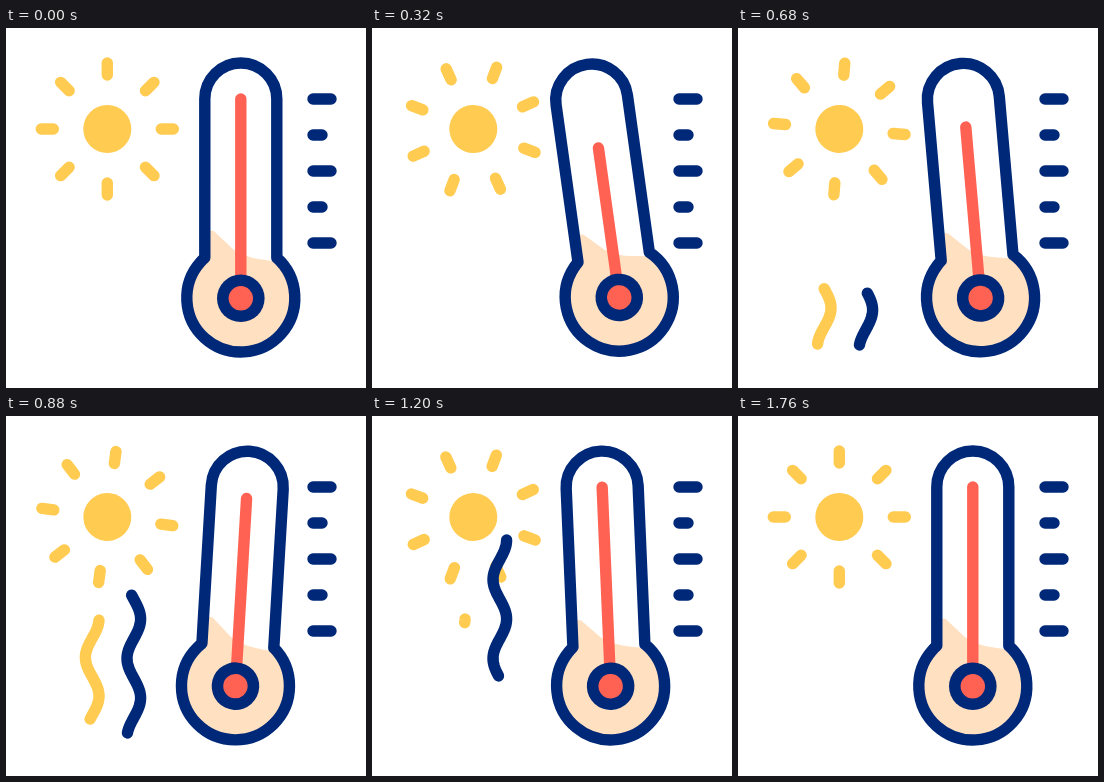
Animation, 360 px wide and 360 px high, one loop 2 s. Source, as an HTML page with a canvas:

```html
<!DOCTYPE html>
<html lang="en">
<head>
<meta charset="utf-8">
<title>Thermometer and sun</title>
<style>
  html, body { margin: 0; width: 100%; height: 100%; overflow: hidden; background: #fff; }
  canvas { display: block; width: 360px; height: 360px; }
</style>
</head>
<body>
<canvas id="stage"></canvas>
<script>
const NAVY = '#002878', RED = '#ff6253', YELLOW = '#ffcb50', PEACH = '#ffe0c0';
const LOOP = 2000, STEP = 40, REST = 1760, TAU = Math.PI * 2;

const canvas = document.getElementById('stage');
const dpr = window.devicePixelRatio || 1;
canvas.width = canvas.height = Math.round(360 * dpr);
const ctx = canvas.getContext('2d');

// Eased progress from 0 to 1 between times a and b; skew > 1 delays the start.
function ramp(t, a, b, skew = 1) {
  const u = Math.pow(Math.min(1, Math.max(0, (t - a) / (b - a))), skew);
  return u * u * (3 - 2 * u);
}

// Eased value through [time, value] keys.
function track(t, keys) {
  let v = keys[0][1];
  for (let i = 1; i < keys.length; i++) {
    v += (keys[i][1] - keys[i - 1][1]) * ramp(t, keys[i - 1][0], keys[i][0]);
  }
  return v;
}

function line(color, x1, y1, x2, y2) {
  ctx.strokeStyle = color;
  ctx.beginPath();
  ctx.moveTo(x1, y1);
  ctx.lineTo(x2, y2);
  ctx.stroke();
}

function disc(color, x, y, r) {
  ctx.fillStyle = color;
  ctx.beginPath();
  ctx.arc(x, y, r, 0, TAU);
  ctx.fill();
}

function turned(x, y, deg, draw) {
  ctx.save();
  ctx.translate(x, y);
  ctx.rotate(deg * Math.PI / 180);
  draw();
  ctx.restore();
}

function sun(t) {
  const deg = -40.5 * (ramp(t, 0, 565) - ramp(t, 560, REST, 1.35));
  turned(101.3, 101, deg, () => {
    disc(YELLOW, 0, 0, 24);
    for (let i = 0; i < 8; i++) {
      line(YELLOW, 0, -54, 0, -66);
      ctx.rotate(TAU / 8);
    }
  });
}

// Rising heat wave, visible from its tail up to its head.
function wave(color, mid, bottom, top, period, head, tail) {
  if (head <= 0 || tail >= 1) return;
  const from = bottom + (top - bottom) * tail;
  const to = bottom + (top - bottom) * head;
  const x = y => mid + 6.8 * Math.cos(TAU * (y - 203) / period);
  ctx.strokeStyle = color;
  ctx.beginPath();
  ctx.moveTo(x(from), from);
  for (let y = from - 1; y > to; y--) ctx.lineTo(x(y), y);
  ctx.lineTo(x(to), to);
  ctx.stroke();
}

function waves(t) {
  wave(YELLOW, 86.2, 316, 203, 77, ramp(t, 458, 908), ramp(t, 781, 1251));
  wave(NAVY, 127.8, 317, 124, 79, ramp(t, 458, 1110), ramp(t, 954, 1637));
}

// Local origin is the pivot, halfway down the stage.
function body() {
  const a = Math.acos(36 / 54);
  ctx.beginPath();
  ctx.arc(0, -109, 36, Math.PI, 0);
  ctx.lineTo(36, 50);
  ctx.arc(0, 90, 54, -a, Math.PI + a);
  ctx.closePath();
}

function liquid() {
  ctx.save();
  body();
  ctx.clip();
  ctx.fillStyle = PEACH;
  ctx.beginPath();
  ctx.moveTo(-37, 22);
  ctx.lineTo(-27, 23);
  ctx.lineTo(-8, 41);
  ctx.quadraticCurveTo(4, 49, 18, 51);
  ctx.lineTo(37, 54);
  ctx.lineTo(70, 54);
  ctx.lineTo(70, 150);
  ctx.lineTo(-70, 150);
  ctx.lineTo(-70, 22);
  ctx.fill();
  ctx.restore();
}

function thermometer(t) {
  const deg = track(t, [[0, 0], [525, -12], [855, 3.5], [1175, -2.5], [1450, 0]]);
  const drop = 48.5 * (ramp(t, 0, 297) - ramp(t, 297, 1145));
  turned(234.8, 180, deg, () => {
    liquid();
    line(RED, 0, -109 + drop, 0, 72);
    body();
    ctx.strokeStyle = NAVY;
    ctx.stroke();
    disc(NAVY, 0, 90.3, 23.8);
    disc(RED, 0, 90.3, 12.2);
  });
}

function ticks() {
  for (let i = 0; i < 5; i++) {
    const y = 71 + 36 * i;
    line(NAVY, 307, y, i % 2 ? 316 : 325, y);
  }
}

function draw(t) {
  ctx.setTransform(dpr, 0, 0, dpr, 0, 0);
  ctx.fillStyle = '#fff';
  ctx.fillRect(0, 0, 360, 360);
  ctx.lineWidth = 11.4;
  ctx.lineCap = ctx.lineJoin = 'round';
  sun(t);
  waves(t);
  thermometer(t);
  ticks();
}

let start;
function tick(now) {
  if (start === undefined) start = now;
  const t = Math.max(0, now - start) % LOOP;
  draw(Math.min(REST, Math.floor(t / STEP) * STEP));
  requestAnimationFrame(tick);
}
draw(0);
requestAnimationFrame(tick);
</script>
</body>
</html>
```
